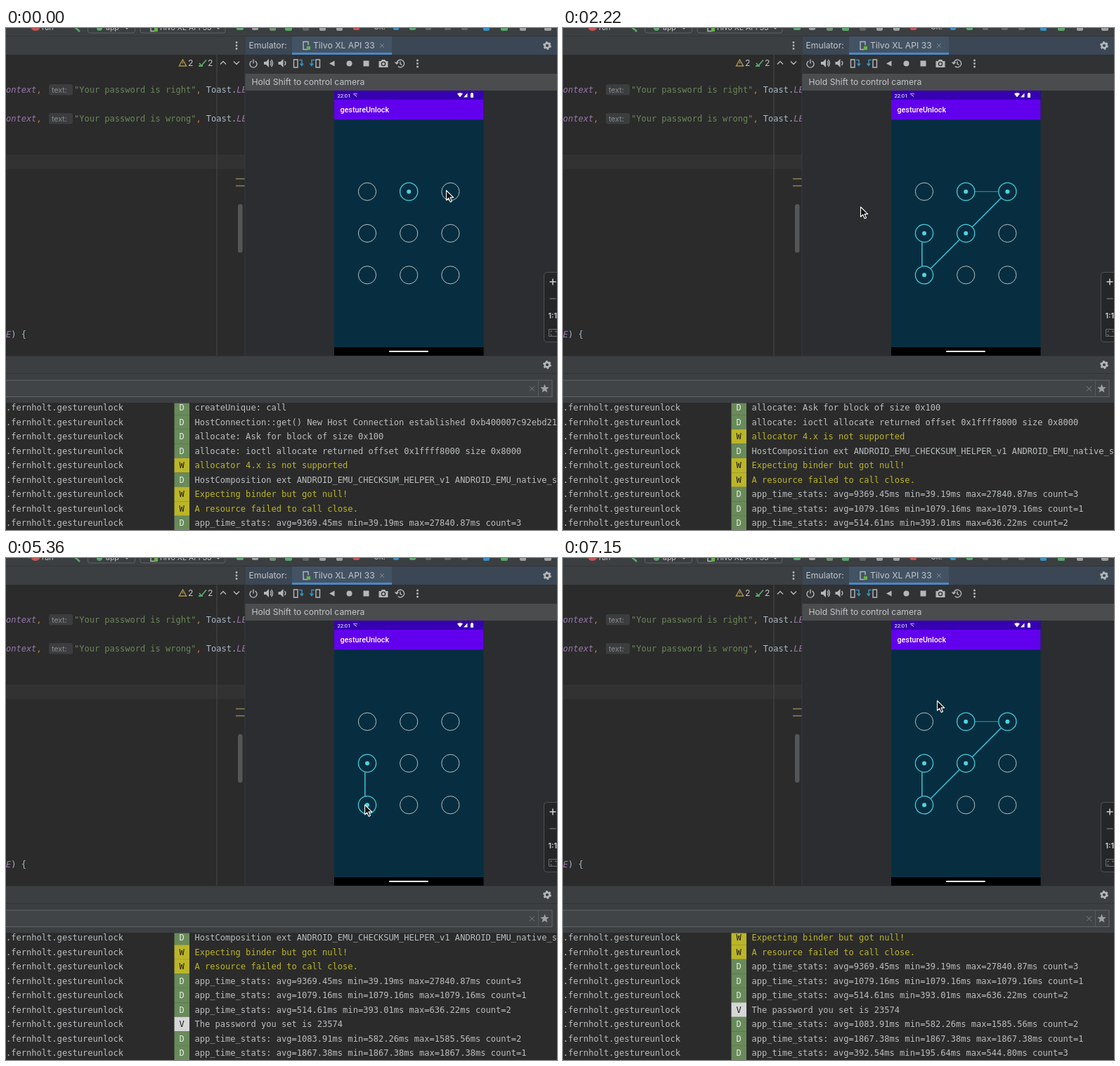
An HTML page for the animation above (8 s loop, 784 by 714 pixels).

```html
<!DOCTYPE html>
<html lang="en">
<head>
<meta charset="utf-8">
<title>Pattern unlock demo</title>
<style>
html, body { margin: 0; width: 100%; height: 100%; overflow: hidden; background: #2b2b2b; }
svg { display: block; }
text { white-space: pre; }
.ui { font: 12.2px Inter, "Open Sans", sans-serif; fill: #c3c5c7; }
.top { font-size: 10.5px; }
.hint { font-size: 10.6px; fill: #8a8d8f; }
.mono { font: 12.07px "DejaVu Sans Mono", "Noto Sans Mono", monospace; fill: #bbbdbf; }
.code { font-size: 12px; fill: #a9b7c6; }
.var { fill: #9876aa; font-style: italic; }
.str { fill: #6a8759; }
.sep { fill: #cc7832; }
.phone { font: 500 10.75px Roboto, sans-serif; fill: #fff; }
.line { fill: none; stroke: #b4b7b9; stroke-width: 1.4; }
.solid { fill: #b4b7b9; }
.W { fill: #bbb529; }
.node circle { fill: none; stroke: #b9bebf; stroke-width: 1; }
.node .core { stroke: none; }
.node.on circle { stroke: #46cbdc; stroke-width: 1.3; }
.node.on .core { fill: #4fd4e4; stroke: none; }
.link { stroke: #3fc4d6; stroke-width: 1.5; visibility: hidden; }
.link.thin { stroke-width: 1; stroke: #2d97a8; }
.link.on { visibility: visible; }
</style>
</head>
<body>
<svg width="784" height="714" viewBox="0 0 784 714">
  <defs>
    <clipPath id="logClip"><rect y="533.5" width="784" height="181"/></clipPath>
    <clipPath id="codeClip"><rect y="38" width="340" height="428"/></clipPath>
    <g id="gear">
      <circle r="3.4" fill="none" stroke="#b4b7b9" stroke-width="2.6"/>
      <circle r="4.9" fill="none" stroke="#b4b7b9" stroke-width="2" stroke-dasharray="2.57 2.56"/>
    </g>
    <g id="speaker">
      <path class="solid" d="M-6-2h3l4-4v12l-4-4h-3z"/>
      <path class="line" d="M3-3q2.5 3 0 6"/>
    </g>
    <g id="device">
      <path class="line" d="M3 5.5h-7v-11h7v5"/>
      <rect x="1" y="1" width="5" height="5" fill="#62b543"/>
    </g>
  </defs>

  <!-- main toolbar, cut by the top edge -->
  <rect width="784" height="12" fill="#3c3f41"/>
  <ellipse cx="42" cy="0" rx="6" ry="4" fill="#c75450"/>
  <text class="ui top" x="51" y="3">run</text>
  <path d="M97-2l8 7" stroke="#59a869" stroke-width="2.6"/>
  <g fill="none" stroke="#5e6163">
    <rect x="116.5" y="-12" width="67" height="19" rx="3"/>
    <rect x="191" y="-12" width="121" height="19" rx="3"/>
  </g>
  <circle cx="133" cy="0" r="4" fill="#59a869"/>
  <text class="ui top" x="142" y="3">app</text>
  <use href="#device" x="210" y="-1"/>
  <text class="ui top" x="217" y="3">Tilvo XL API 33</text>
  <path class="line" d="M169-2l3 3 3-3M299-2l3 3 3-3"/>
  <g id="topIcons"></g>
  <text class="ui top" x="523" y="2">Git:</text>
  <rect y="11" width="784" height="1" fill="#323335"/>

  <!-- editor -->
  <rect y="12" width="340" height="26" fill="#3c3f41"/>
  <g class="solid"><circle cx="328" cy="20.5" r="1.4"/><circle cx="328" cy="25" r="1.4"/><circle cx="328" cy="29.5" r="1.4"/></g>
  <rect y="38" width="340" height="428" fill="#2b2b2b"/>
  <rect y="180" width="340" height="20.5" fill="#323232"/>
  <rect x="299.5" y="38" width="1" height="428" fill="#4b4b4b"/>
  <path d="M251.500 45l5 9h-10z" fill="none" stroke="#a8904c" stroke-width="1.5"/>
  <path d="M251.500 48v3" stroke="#a8904c"/>
  <text class="ui" x="259" y="53.500">2</text>
  <path d="M275 50l3 3.500 7-8M274 54h6" fill="none" stroke="#59a869" stroke-width="1.8"/>
  <text class="ui" x="287" y="53.500">2</text>
  <path class="line" d="M305 51.500l4-4 4 4M324 47.500l4 4 4-4"/>
  <g clip-path="url(#codeClip)" id="code"></g>
  <path d="M327 214.500h13M327 224.500h13" stroke="#8b8556" stroke-width="1.5"/>
  <rect x="330" y="250.500" width="6.500" height="69" rx="3" fill="#555657"/>

  <!-- emulator panel -->
  <rect x="340" y="12" width="444" height="26" fill="#3b4754"/>
  <rect x="407" y="12" width="142" height="26" fill="#435364"/>
  <rect x="407" y="35" width="142" height="3" fill="#4a88c7"/>
  <text class="ui" x="345.500" y="29">Emulator:</text>
  <use href="#device" x="427" y="25"/>
  <text class="ui" x="437" y="29">Tilvo XL API 33</text>
  <path d="M532 22l6 6m0-6l-6 6" stroke="#7f878f"/>
  <use href="#gear" x="770" y="25"/>
  <rect x="340" y="38" width="444" height="428" fill="#2b2d30"/>
  <rect x="340" y="38" width="444" height="27" fill="#303234"/>
  <rect x="340" y="65" width="444" height="24" fill="#4a4c4e"/>
  <text class="ui" x="349.500" y="81">Hold Shift to control camera</text>
  <rect x="339.500" y="12" width="1" height="454" fill="#393b3d"/>
  <path class="line" d="M349.500 46.800a5 5 0 1 0 5 0M352 44.500v6"/>
  <use href="#speaker" x="373" y="50"/>
  <path class="line" d="M377.500 45q4 5 0 10"/>
  <use href="#speaker" x="393.500" y="50"/>
  <path class="line" d="M409.500 45h5.500v11h-5.500zM441 45h5.500v11h-5.500z"/>
  <path d="M417 45.500h4v7m-2.500-2l2.500 3 2-3M439 45.500h-4v7m-2.500-2l2.500 3 2-3" fill="none" stroke="#3592c4" stroke-width="1.500"/>
  <path class="solid" d="M460 50.500l7.500-4v8z"/>
  <circle class="solid" cx="488.500" cy="50.500" r="4"/>
  <rect class="solid" x="508.500" y="46.500" width="8" height="8"/>
  <path class="solid" d="M530.500 47h3l1.500-2h4l1.500 2h3v9h-13z"/>
  <circle cx="537" cy="51" r="2.600" fill="#b4b7b9" stroke="#303234" stroke-width="1.300"/>
  <path class="line" d="M556 50.500a5.300 5.300 0 1 1 1.800 4M553.500 48.500l2.500 2.500 2.500-2.500M561 47.500v3.500l2.500 1.500"/>
  <g class="solid"><circle cx="585.500" cy="46" r="1.500"/><circle cx="585.500" cy="50.500" r="1.500"/><circle cx="585.500" cy="55" r="1.500"/></g>

  <!-- zoom controls -->
  <rect x="765.500" y="347.500" width="30" height="99" rx="4" fill="#252628" stroke="#505254"/>
  <path d="M773.500 361h9M778 356.500v9" stroke="#d0d2d3" stroke-width="1.500"/>
  <path d="M773.500 385h9" stroke="#65686a" stroke-width="1.500"/>
  <text class="ui" x="771.500" y="413" style="font-size:10.500px;font-weight:700">1:1</text>
  <path d="M772.500 428.500h12v10h-12zM775 433v-2h2m-2 4v2h2m4-6h2v2" fill="none" stroke="#6c6f71"/>

  <!-- phone -->
  <rect x="467" y="89" width="212.500" height="377" fill="#072e40"/>
  <rect x="467" y="89" width="212.500" height="13" fill="#3700b3"/>
  <rect x="467" y="102" width="212.500" height="28.500" fill="#6200ee"/>
  <rect x="467" y="454" width="212.500" height="12" fill="#000"/>
  <rect x="545" y="459" width="56" height="2" rx="1" fill="#fff"/>
  <text class="phone" x="471.500" y="98.700" style="font-size:7.600px;font-weight:400">22:01</text>
  <path d="M494 94q3-2 6 0M495.500 96q1.500-1 3 0M494.500 93l4.500 5" fill="none" stroke="#b6a2e2"/>
  <path d="M642 93.500q4-2.500 8 0l-4 5zM651 98.500h5.500v-6z" fill="#fff"/>
  <path d="M661 93h1v-1h2v1h1v6h-4z" fill="#fff"/>
  <text class="phone" x="475.500" y="120">gestureUnlock</text>
  <g id="links"></g>
  <g id="nodes"></g>

  <!-- log panel -->
  <rect y="466" width="784" height="68" fill="#3c3f41"/>
  <rect y="466" width="784" height="1" fill="#323436"/>
  <rect y="491" width="784" height="1" fill="#323436"/>
  <use href="#gear" x="770" y="479"/>
  <rect x="-3" y="501" width="780" height="23.500" fill="#414446" stroke="#626567"/>
  <path d="M757.500 501v23.500" stroke="#55585a"/>
  <path d="M745 509.500l7 7m0-7l-7 7" stroke="#7b7e80"/>
  <path d="M766.500 506.500l1.700 4.200 4.500.3-3.500 2.900 1.200 4.400-3.900-2.400-3.900 2.400 1.200-4.400-3.500-2.900 4.500-.3z" fill="#9da0a2"/>
  <rect y="533" width="784" height="181" fill="#2b2b2b"/>
  <g clip-path="url(#logClip)"><g id="log"></g></g>

  <path id="cursor" d="M0 0V14l3.200-3 2.500 5.400 2.300-1-2.400-5.300h4.600z" fill="#111" stroke="#fff" stroke-width="1.100" stroke-linejoin="round"/>
</svg>
<script>
const LOOP = 8000, ROW = 20.5;
const $ = id => document.getElementById(id);

// x, y, width, height, colour
$("topIcons").innerHTML = [
  [328, -3, 10, 6, "#59a869"], [350, -2, 9, 5, "#9da0a2"], [375, -3, 9, 7, "#6e8f73"],
  [397, -4, 10, 8, "#59a869"], [422, -3, 9, 7, "#626567"], [446, -3, 9, 7, "#9da0a2"],
  [470, -3, 9, 7, "#9da0a2"], [494, -5, 9, 8, "#c75450"], [551, -4, 8, 7, "#3592c4"],
  [574, -4, 9, 7, "#59a869"], [597, -4, 8, 7, "#626567"], [624, -4, 9, 7, "#626567"],
  [648, -4, 9, 7, "#626567"], [679, -3, 9, 7, "#3592c4"], [704, -4, 10, 8, "#59a869"],
  [731, -3, 9, 7, "#9da0a2"], [766, -3, 10, 7, "#9da0a2"]
].map(([x, y, w, h, c]) => `<rect x="${x}" y="${y}" width="${w}" height="${h}" rx="2" fill="${c}"/>`).join("");

const toast = (word, y) => `
  <text class="mono code" x="0" y="${y + 4}"><tspan class="var">ontext</tspan><tspan class="sep">,</tspan></text>
  <rect x="61" y="${y - 8}" width="34" height="15.5" rx="3" fill="#3b3d3e"/>
  <text class="ui hint" x="65" y="${y + 3.5}">text:</text>
  <text class="mono code" x="97" y="${y + 4}"><tspan class="str">"Your password is ${word}"</tspan><tspan class="sep">,</tspan> Toast.<tspan class="var">LENGTH</tspan></text>`;
$("code").innerHTML = toast("right", 88) + toast("wrong", 129) +
  `<text class="mono code" x="0" y="440"><tspan class="var">E</tspan>) {</text>`;

const stats = (avg, min, max, count) =>
  `D app_time_stats: avg=${avg}ms min=${min}ms max=${max}ms count=${count}`;
const entries = [
  "D createUnique: call",
  "D HostConnection::get() New Host Connection established 0xb400007c92ebd210",
  "D allocate: Ask for block of size 0x100",
  "D allocate: ioctl allocate returned offset 0x1ffff8000 size 0x8000",
  "W allocator 4.x is not supported",
  "D HostComposition ext ANDROID_EMU_CHECKSUM_HELPER_v1 ANDROID_EMU_native_sync_v2",
  "W Expecting binder but got null!",
  "W A resource failed to call close.",
  stats("9369.45", "39.19", "27840.87", 3),
  stats("1079.16", "1079.16", "1079.16", 1),
  stats("514.61", "393.01", "636.22", 2),
  "V The password you set is 23574",
  stats("1083.91", "582.26", "1585.56", 2),
  stats("1867.38", "1867.38", "1867.38", 1),
  stats("392.54", "195.64", "544.80", 3)
];
const badge = { D: ["#698a5a", "#e2ecdc"], W: ["#bbb529", "#1c1c1c"], V: ["#d6d6d6", "#1c1c1c"] };
$("log").innerHTML = entries.map((entry, i) => {
  const level = entry[0], [back, ink] = badge[level], y = 540 + i * ROW;
  return `<text class="mono" x="0" y="${y + 4.2}">.fernholt.gestureunlock</text>
    <rect x="239.5" y="${y - ROW / 2}" width="21.500" height="${ROW + 0.1}" fill="${back}"/>
    <text class="mono" x="246.500" y="${y + 4.2}" style="fill:${ink}">${level}</text>
    <text class="mono ${level}" x="268.500" y="${y + 4.2}">${entry.slice(2)}</text>`;
}).join("");

// nodes are numbered 1 to 9, row by row
const place = n => [514 + (n - 1) % 3 * 59.2, 232.7 + Math.floor((n - 1) / 3) * 59.3];
$("nodes").innerHTML = Array.from({ length: 9 }, (_, i) => {
  const [x, y] = place(i + 1);
  return `<g class="node"><circle cx="${x}" cy="${y}" r="12.6"/><circle class="core" cx="${x}" cy="${y}" r="3"/></g>`;
}).join("");

const pairs = [[2, 3], [3, 5], [5, 7], [7, 4]];
$("links").innerHTML = pairs.map(([a, b]) => {
  const [x1, y1] = place(a), [x2, y2] = place(b);
  const len = Math.hypot(x2 - x1, y2 - y1);
  const ux = (x2 - x1) / len * 12.8, uy = (y2 - y1) / len * 12.8;
  const shift = a === 7 ? -3.2 : 0;
  return `<line class="link ${a === 2 ? "thin" : ""}" x1="${x1 + ux + shift}" y1="${y1 + uy}" x2="${x2 - ux + shift}" y2="${y2 - uy}"/>`;
}).join("");

// [time, value...] steps, each held until the next
const scrolls = [[0, 0], [150, 1], [1040, 2], [3270, 4], [5070, 5], [6260, 6]];
const patterns = [
  [0, ""], [0, "2"], [150, "23"], [750, "235"], [1180, "2357"], [1770, "23574"], [3270, ""],
  [5070, "4"], [5360, "47"], [5810, "475"], [6260, "4753"], [6560, "47532"]
];
const moves = [
  [0, 626, 231], [150, 631, 235], [450, 624, 242], [600, 603, 264], [750, 576, 292],
  [900, 544, 324], [1040, 520, 345], [1180, 514, 352], [1480, 514, 342], [1630, 515, 319],
  [1770, 517, 298], [1920, 519, 288], [2220, 423, 254.5], [4170, 434, 259], [4320, 456, 269],
  [4470, 480, 281], [4620, 498, 289], [4770, 505, 292], [5070, 507, 297], [5220, 508, 322],
  [5360, 510, 351], [5510, 519, 347], [5660, 545, 321], [5810, 573, 293], [5960, 603, 264],
  [6110, 626, 244], [6260, 636, 227], [6410, 618, 227], [6560, 586, 229], [6700, 576, 230],
  [7000, 554, 215], [7150, 532, 203]
];
const at = (steps, t) => steps.findLast(s => s[0] <= t);

const nodes = [...$("nodes").children], links = [...$("links").children];
function draw(t) {
  const lit = at(patterns, t)[1], [, x, y] = at(moves, t);
  nodes.forEach((node, i) => node.classList.toggle("on", lit.includes(i + 1)));
  links.forEach((link, i) => link.classList.toggle("on", pairs[i].every(n => lit.includes(n))));
  $("log").setAttribute("transform", `translate(0 ${-ROW * at(scrolls, t)[1]})`);
  $("cursor").setAttribute("transform", `translate(${x + 0.5} ${y})`);
}

const start = performance.now();
function tick() {
  draw((performance.now() - start) % LOOP);
  requestAnimationFrame(tick);
}
tick();
</script>
</body>
</html>
```
